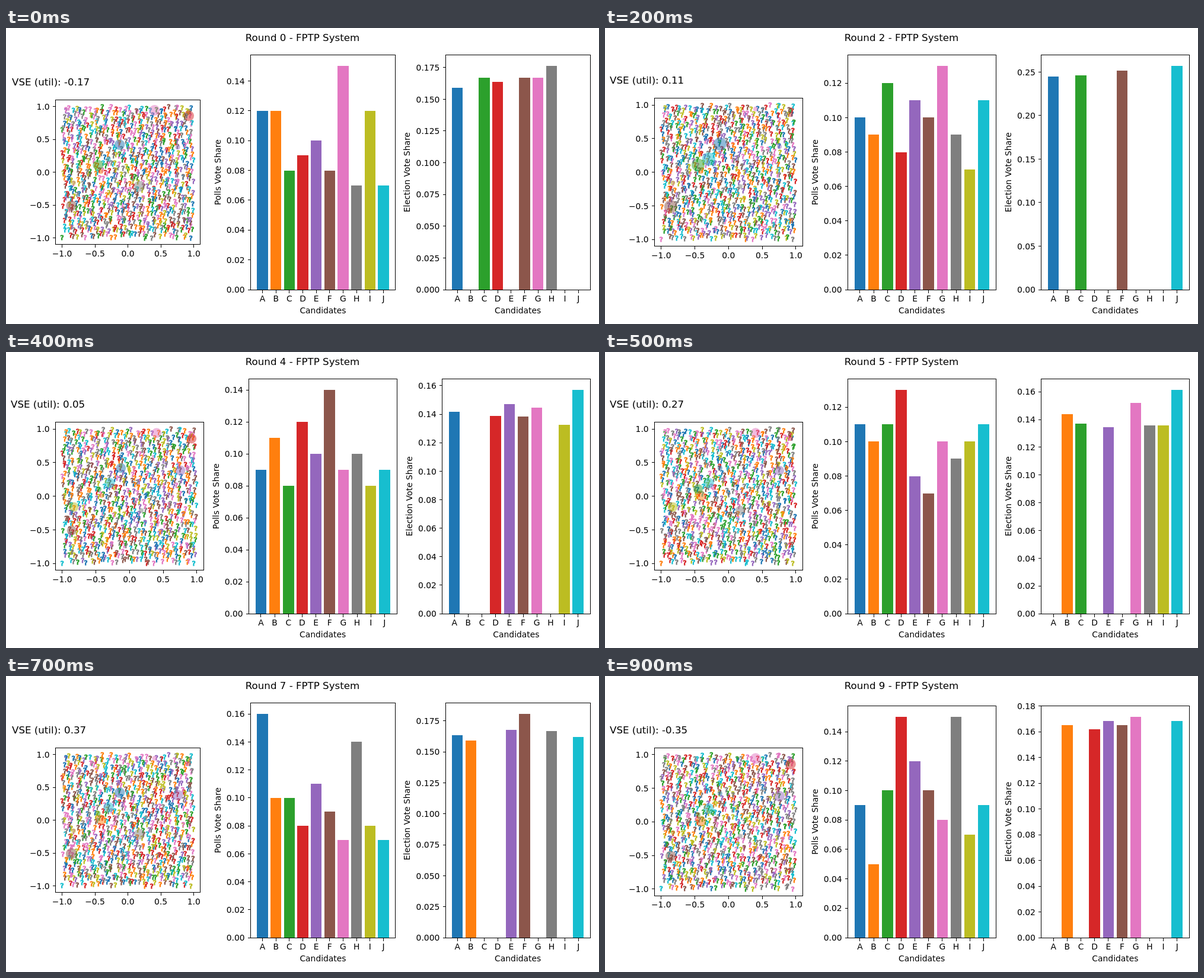
Write an HTML page that moves like this. It is 1000 px wide and 500 px high and loops after 1 s.

```html
<!DOCTYPE html>
<html lang="en">
<head>
<meta charset="utf-8">
<title>Voting rounds</title>
<style>
  html, body { margin: 0; width: 100%; height: 100%; overflow: hidden; background: #fff; }
  svg { display: block; width: 1000px; height: 500px; font: 13.89px "DejaVu Sans", sans-serif; }
  .big { font-size: 16.67px; }
  .mid { text-anchor: middle; }
  .end { text-anchor: end; }
  .line { fill: none; stroke: #000; stroke-width: 1; shape-rendering: crispEdges; }
  .voters { font-size: 11.2px; text-anchor: middle; stroke-width: 1.2; }
</style>
</head>
<body>
<svg id="stage" viewBox="0 0 1000 500"></svg>
<script>
const stage = document.getElementById('stage');
const letters = [...'ABCDEFGHIJ'];
const colors = ['#1f77b4', '#ff7f0e', '#2ca02c', '#d62728', '#9467bd',
  '#8c564b', '#e377c2', '#7f7f7f', '#bcbd22', '#17becf'];
const places = [[-.126, .42], [-.413, .01], [-.452, .108], [.923, .858], [.756, .382],
  [-.858, -.509], [.403, .942], [.174, -.213], [-.827, -.16], [-.294, .197]];
const scores = ['-0.17', '0.18', '0.11', '-0.02', '0.05', '0.27', '0.22', '0.37', '-0.31', '-0.35'];

// Poll shares in percent, one row per round
const polls = [
  [12, 12, 8, 9, 10, 8, 15, 7, 12, 7],
  [12, 15, 8, 10, 8, 8, 10, 10, 6, 13],
  [10, 9, 12, 8, 11, 10, 13, 9, 7, 11],
  [14, 17, 9, 11, 7, 10, 6, 9, 11, 6],
  [9, 11, 8, 12, 10, 14, 9, 10, 8, 9],
  [11, 10, 11, 13, 8, 7, 10, 9, 10, 11],
  [11, 8, 9, 10, 13, 10, 12, 8, 9, 10],
  [16, 10, 10, 8, 11, 9, 7, 14, 8, 7],
  [12, 12, 13, 10, 12, 9, 12, 7, 8, 5],
  [9, 5, 10, 15, 12, 10, 8, 15, 7, 9]
];
const elections = [
  { A: .159, C: .167, D: .1638, F: .167, G: .167, H: .1762 },
  { A: .3315, B: .3135, G: .355 },
  { A: .245, C: .2465, F: .2515, J: .257 },
  { B: .2675, D: .228, H: .26, I: .2445 },
  { A: .1415, D: .139, E: .147, F: .1385, G: .1445, I: .1325, J: .157 },
  { B: .1438, C: .137, E: .1343, G: .152, H: .1357, I: .1357, J: .1613 },
  { B: .201, C: .1935, E: .222, H: .1885, J: .195 },
  { A: .1634, B: .1592, E: .168, F: .1806, H: .1668, J: .162 },
  { A: .2222, D: .201, F: .187, G: .1887, H: .201 },
  { B: .165, D: .1618, E: .1682, F: .165, G: .1715, J: .1682 }
];

function seeded(seed) {
  return () => {
    seed = (seed + 0x6D2B79F5) | 0;
    let t = Math.imul(seed ^ (seed >>> 15), 1 | seed);
    t = (t + Math.imul(t ^ (t >>> 7), 61 | t)) ^ t;
    return ((t ^ (t >>> 14)) >>> 0) / 4294967296;
  };
}

const GRID = 30;
const scatter = seeded(7);
const voters = Array.from({ length: GRID * GRID }, (_, i) => [
  2 * (i % GRID + scatter()) / GRID - 1,
  2 * (Math.floor(i / GRID) + scatter()) / GRID - 1
]);

const snap = v => Math.floor(v) + .5;
const text = (x, y, str, cls = 'mid', extra = '') =>
  `<text x="${x}" y="${y}" class="${cls}" ${extra}>${str}</text>`;
const frame = (l, t, r, b) =>
  `<path class="line" d="M${snap(l)} ${snap(t)}H${snap(r)}V${snap(b)}H${snap(l)}Z"/>`;
const tickX = (x, bottom, label) =>
  `<path class="line" d="M${snap(x)} ${snap(bottom)}v5"/>` + text(x, bottom + 20.3, label);
const tickY = (left, y, label) =>
  `<path class="line" d="M${snap(left)} ${snap(y)}h-5"/>` + text(left - 9.7, y + 5.2, label, 'end');

// Smallest round step that gives at most nine intervals
const tickStep = limit => [.01, .02, .025, .05, .1].find(s => limit / s <= 9.01);

function barChart(left, width, top, values, label, labelX) {
  const bottom = 442, height = bottom - top;
  const limit = 1.05 * Math.max(...values);
  const step = tickStep(limit), digits = step === .025 ? 3 : 2;
  const unit = width / 10.78;
  let out = '';
  values.forEach((v, i) => {
    const x = left + (.49 + i) * unit;
    const x0 = Math.round(x), x1 = Math.round(x + .8 * unit);
    const y = Math.round(bottom - v / limit * height);
    if (v) out += `<rect x="${x0}" y="${y}" width="${x1 - x0}" height="${bottom - y}" fill="${colors[i]}"/>`;
    out += tickX(x + .4 * unit, bottom, letters[i]);
  });
  for (let k = 0; k * step <= limit + 1e-4; k++) {
    out += tickY(left, bottom - k * step / limit * height, (k * step).toFixed(digits));
  }
  const midY = (top + bottom) / 2;
  return out + frame(left, top, left + width, bottom) +
    text(left + width / 2, 482, 'Candidates') +
    text(labelX, midY, label, 'mid', `transform="rotate(-90 ${labelX} ${midY})"`);
}

function voterMap(round, width, midY, shares, titleX) {
  const left = 83.4, half = width / 2, midX = left + half;
  const top = midY - half, bottom = midY + half, scale = half / 1.1;
  const px = x => midX + x * scale, py = y => midY - y * scale;
  const pick = seeded(100 + round);
  let out = '<g class="voters">';
  for (const [x, y] of voters) {
    const c = colors[Math.floor(pick() * 10)];
    out += `<text x="${px(x).toFixed(1)}" y="${(py(y) + 4.1).toFixed(1)}" fill="${c}" stroke="${c}">?</text>`;
  }
  out += '</g>';
  places.forEach(([x, y], i) => {
    const r = shares[i] ? 21.96 * Math.sqrt(shares[i]) : 4;
    out += `<circle cx="${px(x)}" cy="${py(y)}" r="${r}" fill="${colors[i]}" fill-opacity=".5"/>`;
  });
  for (let v = -1; v <= 1; v += .5) {
    const label = v.toFixed(1).replace('-', '\u2212');
    out += tickX(px(v), bottom, label) + tickY(left, py(v), label);
  }
  return out + frame(left, top, left + width, bottom) +
    text(titleX, top - 24.6, `VSE (util): ${scores[round]}`, 'big');
}

function drawRound(round) {
  const shares = letters.map(l => elections[round][l] || 0);
  const limit = 1.05 * Math.max(...shares), step = tickStep(limit);
  const narrow = step === .025;
  const intervals = limit / step;
  const top = Math.abs(intervals - Math.round(intervals)) < .01 ? 50.5 : 45.3;
  const width = narrow ? 244.4 : 249.7;
  const midY = (top + 442) / 2;
  stage.innerHTML =
    text(500, 22, `Round ${round} - FPTP System`, 'big mid') +
    voterMap(round, width, midY, shares, narrow ? 10 : 8) +
    barChart(narrow ? 412.3 : 409.3, width, top, polls[round].map(p => p / 100),
      'Polls Vote Share', narrow ? 362 : 359) +
    barChart(narrow ? 741 : 735.6, width, top, shares,
      'Election Vote Share', narrow ? 681 : 685);
}

const start = performance.now();
let shown = -1;
function tick() {
  const round = Math.floor((performance.now() - start) % 1000 / 100);
  if (round !== shown) drawRound(shown = round);
  requestAnimationFrame(tick);
}
tick();
</script>
</body>
</html>
```
